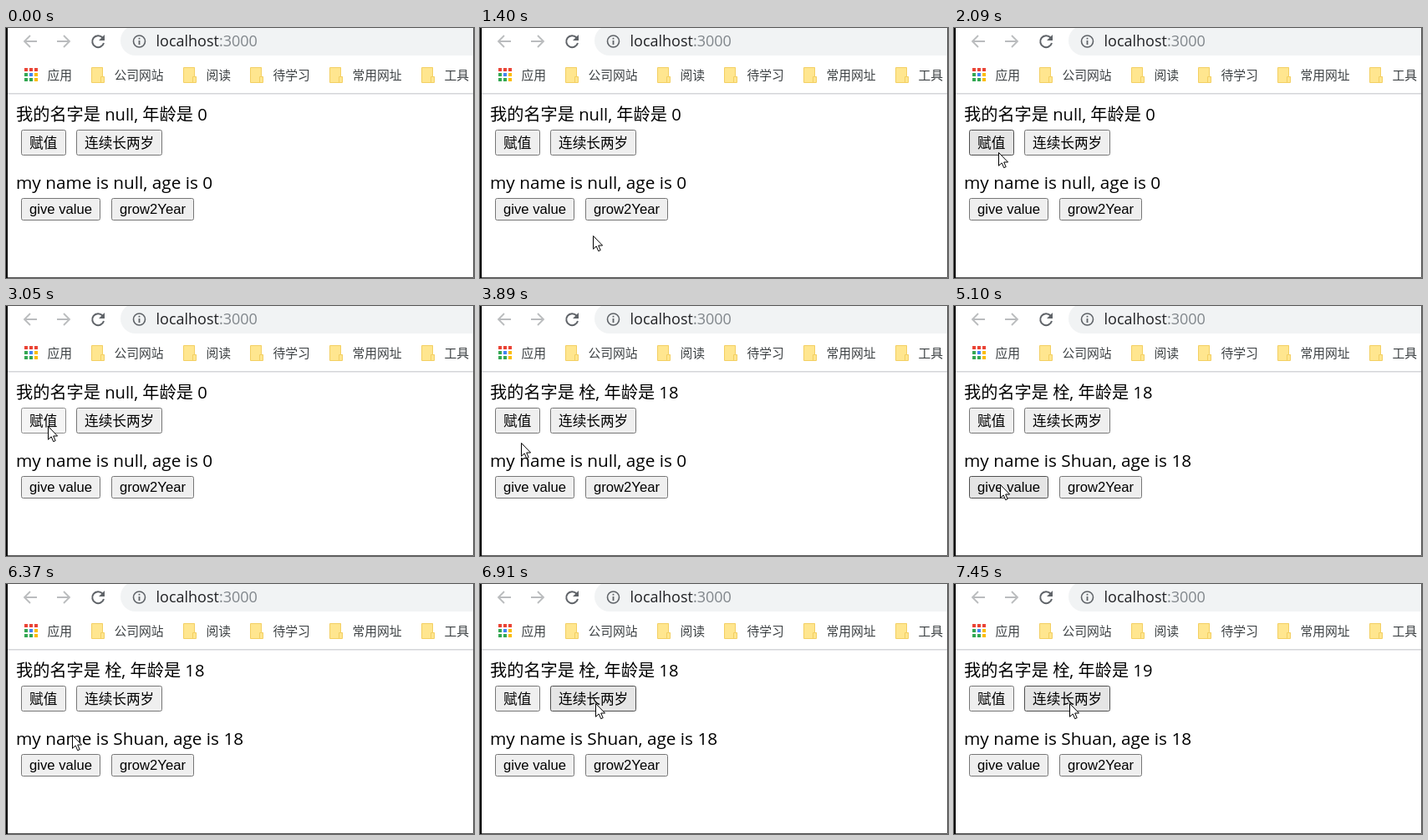
An HTML page that plays this animation: 560 by 300 pixels, repeating every 8000 ms.

```html
<!DOCTYPE html>
<html lang="zh-CN">
<head>
<meta charset="utf-8">
<style>
  html, body { margin: 0; width: 100%; height: 100%; overflow: hidden; background: #fff; }
  svg { display: block; width: 560px; height: 300px; }
  text { font-family: "Open Sans", "Noto Sans CJK SC", "Noto Sans CJK", sans-serif; white-space: pre; }
  .bookmark { font-size: 14.8px; fill: #3c4043; }
  .button rect { fill: #efefef; stroke: #767676; }
  .button.hover rect { fill: #e5e5e5; stroke: #4f4f4f; }
  .button.active rect { fill: #f5f5f5; stroke: #8d8d8d; }
  .button text { font: 16.67px "Liberation Sans", "Noto Sans CJK SC", "Noto Sans CJK", sans-serif; }
</style>
</head>
<body>
<svg viewBox="0 0 560 300">
  <rect width="560" height="300" fill="#fff"/>
  <rect x="137" y="-3" width="460" height="36" rx="18" fill="#f1f3f4"/>
  <g fill="none" stroke-width="1.8">
    <path d="M37 16H22M29 9l-7 7 7 7M61 16h15M69 9l7 7-7 7" stroke="#babcbe"/>
    <path d="M115.500 11.500A7 7 0 1 0 117 18" stroke="#5f6368" stroke-width="2"/>
    <circle cx="159.500" cy="16" r="7" stroke="#5f6368" stroke-width="1.6"/>
  </g>
  <path d="M118 8v7h-7zM158.600 15h1.800v5h-1.800zM158.600 11.800h1.800v1.800h-1.800z" fill="#5f6368"/>
  <text x="179.500" y="22" font-size="18" fill="#202124">localhost<tspan fill="#80868b">:3000</tspan></text>
  <g id="bookmarks"></g>
  <rect y="78" width="560" height="1.500" fill="#d4d6d9"/>
  <text id="chinese" x="12" y="111" font-size="20.2"></text>
  <text id="english" x="12" y="193" font-size="20.75"></text>
  <g id="buttons"></g>
  <path d="M559.500 0V299.500H0" fill="none" stroke="#555"/>
  <rect width="2" height="300" fill="#000"/>
  <path id="cursor" d="M.5 .5V16.300L4.200 12.900 6.700 18.700 9.200 17.600 6.700 12H11.600Z" fill="#fff" stroke="#000"/>
</svg>
<script>
const byId = id => document.getElementById(id);

function add(parent, tag, attributes, content = '') {
  const node = document.createElementNS('http://www.w3.org/2000/svg', tag);
  for (const name in attributes) node.setAttribute(name, attributes[name]);
  node.textContent = content;
  return parent.appendChild(node);
}

const bookmarks = byId('bookmarks');
const RED = '#ea4335', GREEN = '#34a853', BLUE = '#4285f4', YELLOW = '#fbbc05';
[RED, RED, RED, GREEN, BLUE, YELLOW, GREEN, GREEN, YELLOW].forEach((fill, i) =>
  add(bookmarks, 'rect', { x: 22 + i % 3 * 6, y: 48 + Math.floor(i / 3) * 6, width: 4, height: 4, fill }));

function addFolder(x) {
  const transform = `translate(${x} 47)`;
  add(bookmarks, 'path', { transform, d: 'M1 0H14V11H16V18H1Z', fill: '#ffe68f' });
  add(bookmarks, 'path', { transform, d: 'M.5 .5H13.5V11.5H15.5V18.5H.5ZM11.5 18V11.5H13.5', fill: 'none', stroke: '#f3cf62' });
}

[['应用', 50], ['公司网站', 130], ['阅读', 240], ['待学习', 320], ['常用网址', 415], ['工具', 525]]
  .forEach(([label, x], i) => {
    if (i) addFolder(x - 28);
    add(bookmarks, 'text', { x: x - .6, y: 61.5, class: 'bookmark' }, label);
  });

function addButton(label, x, y, width, height, baseline) {
  const group = add(byId('buttons'), 'g', { class: 'button' });
  add(group, 'rect', { x: x + .5, y: y + .5, width: width - 1, height: height - 1, rx: 2 });
  add(group, 'text', { x: x + 10, y: baseline }, label);
  return group;
}

const assign = addButton('赋值', 18, 122, 54, 31, 144);
const growTwo = addButton('连续长两岁', 84, 122, 103, 31, 144);
const give = addButton('give value', 18, 204, 95, 27, 223);
const growYear = addButton('grow2Year', 126, 204, 99, 27, 223);
const buttons = [assign, growTwo, give, growYear];

// Pointer stops: time, x, y, hovered button
const stops = [
  [1400, 135, 249],
  [1670, 98, 207, give],
  [1790, 71, 175],
  [1950, 57, 159],
  [2090, 53, 149, assign],
  [2210, 50, 144, assign],
  [3890, 49, 164],
  [4030, 50, 184],
  [4150, 51, 203],
  [4310, 55, 212, give],
  [4450, 55, 214, give],
  [6370, 79, 181],
  [6510, 103, 164],
  [6660, 121, 151, growTwo],
  [6785, 133, 146, growTwo],
  [6910, 138, 143, growTwo],
];
const presses = [[3050, 3170], [4850, 5100], [7310, 7450]];

function render(time) {
  const stop = stops.findLast(([start]) => time >= start);
  const pressed = presses.some(([down, up]) => time >= down && time < up);
  const [, x = 0, y = 0, hovered] = stop || [];

  byId('cursor').setAttribute('visibility', stop ? 'visible' : 'hidden');
  byId('cursor').setAttribute('transform', `translate(${x} ${y})`);
  for (const button of buttons) {
    const state = button !== hovered ? '' : pressed ? ' active' : ' hover';
    button.setAttribute('class', 'button' + state);
  }

  const [name, age] = time < 3170 ? ['null', 0] : ['栓', time < 7450 ? 18 : 19];
  byId('chinese').textContent = `我的名字是 ${name}, 年龄是 ${age}`;
  byId('english').textContent = time < 5100
    ? 'my name is null, age is 0'
    : 'my name is Shuan, age is 18';
}

const begin = performance.now();
function tick() {
  render((performance.now() - begin) % 8000);
  requestAnimationFrame(tick);
}
tick();
</script>
</body>
</html>
```
